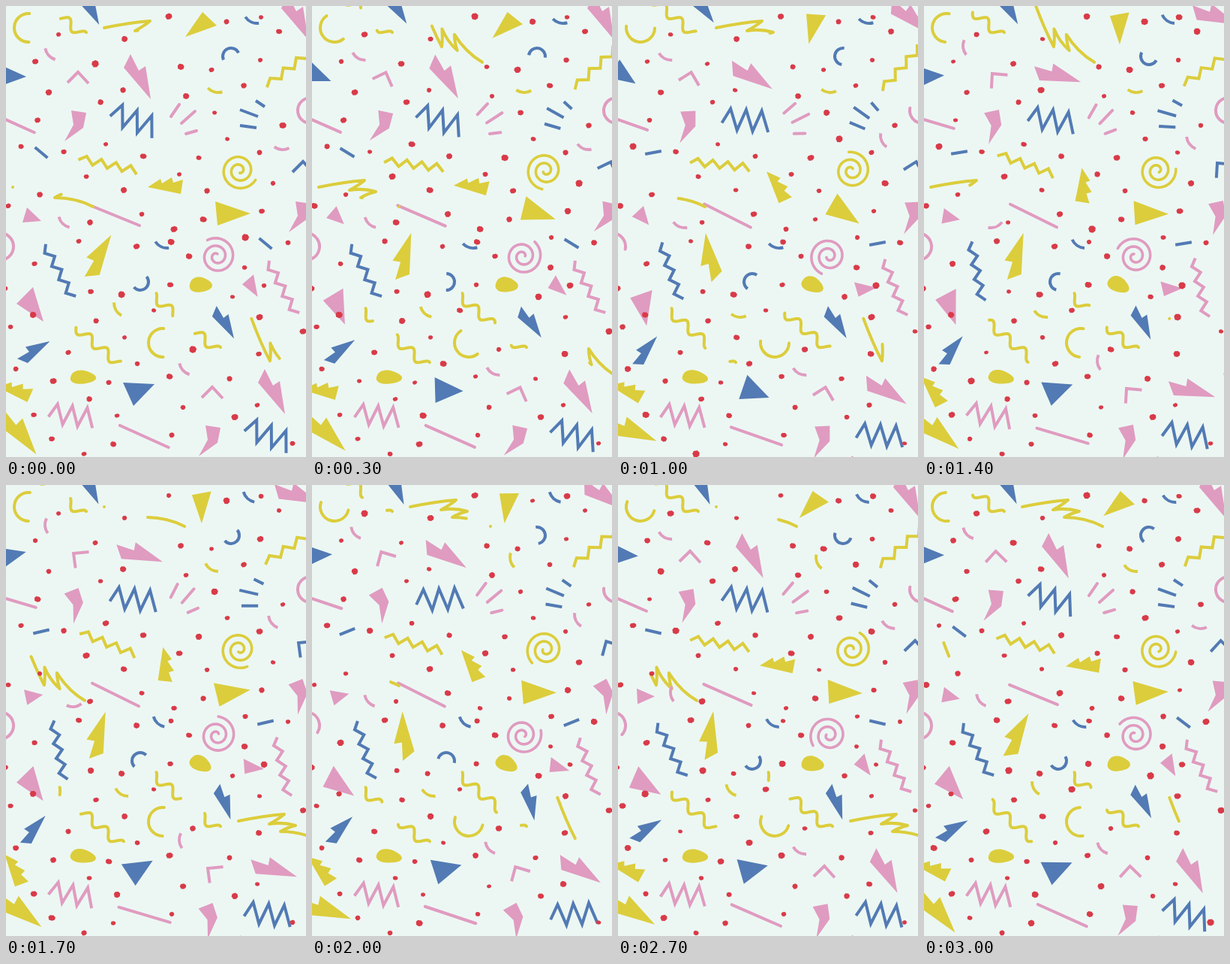
An HTML page for the animation above (3100 ms loop, 400 by 600 pixels).

```html
<!DOCTYPE html>
<html lang="en">
<head>
<meta charset="utf-8">
<title>Confetti</title>
<style>
html, body { margin: 0; width: 100%; height: 100%; overflow: hidden; background: #ecf7f3; }
svg { display: block; width: 400px; height: 600px; }
</style>
</head>
<body>
<svg id="stage" viewBox="0 0 400 600"></svg>
<script>
const stage = document.getElementById('stage');
const YELLOW = '#dccd3c', BLUE = '#527ab4', PINK = '#e09bc0', RED = '#d93a48';
const STEP = 100, COUNT = 31, TAU = Math.PI * 2;
// the pattern repeats on a tilted square lattice
const HERE = [0, 0], EAST = [299, 121], SOUTH = [-120, 299], DIAG = [179, 419];
const parts = [], dots = [];

const frac = v => v - Math.floor(v);
const clamp = v => Math.max(0, Math.min(1, v));
const noise = (a, b) => frac(Math.sin(a * 127.1 + b * 311.7 + 7.3) * 43758.5453);
const toPath = p => 'M' + p.map(v => +v.toFixed(2)).join(' ');

function node(attrs) {
  const el = document.createElementNS('http://www.w3.org/2000/svg', 'path');
  for (const k in attrs) el.setAttribute(k, attrs[k]);
  stage.appendChild(el);
  return el;
}

function middle(p) {
  const mid = odd => {
    const a = p.filter((v, i) => i % 2 === odd);
    return (Math.min(...a) + Math.max(...a)) / 2;
  };
  return [mid(0), mid(1)];
}

// sway = [one slow hump, two humps, one sine] in degrees
function turn([slow, twice = 0, sine = 0], n) {
  const a = TAU * n / COUNT;
  return slow * (1 - Math.cos(a)) / 2 + twice * (1 - Math.cos(2 * a)) / 2 + sine * Math.sin(a);
}

function add(attrs, mid, sway, { at = [HERE], base = 0, trim, spin } = {}) {
  for (const pos of at) parts.push({ el: node(attrs), pos, mid, sway, base, trim, spin });
}

function fill(color, p, sway, opt) {
  add({ d: toPath(p) + 'Z', fill: color }, middle(p), sway, opt);
}

function stroke(color, d, mid, sway, opt = {}) {
  add({
    d, fill: 'none', stroke: color, 'stroke-width': opt.width || 4, pathLength: 100,
    'stroke-linecap': opt.round ? 'round' : 'butt',
    'stroke-linejoin': opt.round ? 'round' : 'miter'
  }, mid, sway, opt);
}

function line(color, p, sway, opt) { stroke(color, toPath(p), middle(p), sway, opt); }

function bolt(color, x, y, size, base, sway, at) {
  const p = [-9, -30, 2, -8, 11, -14, 18, 30, -18, -12].map((v, i) => v * size + (i % 2 ? y : x));
  add({ d: toPath(p) + 'Z', fill: color }, [x, y], sway, { base, at });
}

function comb(x, y, base, sway) {
  const p = [-24, 1, -7, -10, -5, -4, 8, -12, 10, -5, 23, -9, 20, 10];
  fill(YELLOW, p.map((v, i) => v + (i % 2 ? y : x)), sway, { base });
}

function blob(x, y, w, h, sway) {
  const p = [];
  for (let a = 0; a < TAU; a += 0.16) {
    const r = 1 + 0.07 * Math.sin(3 * a + 1);
    p.push(x + w * r * Math.cos(a), y + h * r * Math.sin(a));
  }
  fill(YELLOW, p, sway);
}

// zigzag of equal teeth, centred on x, y
function zigzag(color, x, y, count, step, amp, base, sway, at) {
  const p = [];
  for (let i = 0; i < count; i++)
    p.push(x + (i - (count - 1) / 2) * step, y + (i % 2 ? -amp : amp) * (i ? 1 : 0.4));
  stroke(color, toPath(p), [x, y], sway, { base, at });
}

// arc whose middle points along base
function arc(color, x, y, r, span, base, sway, opt) {
  const a = span * TAU / 720, c = r * Math.cos(a), s = r * Math.sin(a);
  const d = `M${x + c} ${y - s}A${r} ${r} 0 ${span > 180 ? 1 : 0} 1 ${x + c} ${y + s}`;
  stroke(color, d, [x, y], sway, { base, ...opt });
}
const bow = (color, x, y, base, sway, at) => arc(color, x, y, 19, 63, base, sway, { at });

function spiral(color, x, y, base) {
  const p = [];
  for (let k = 0; k <= 1; k += 0.01) {
    const a = k * TAU * 2.15, r = 25 - 22 * k;
    p.push(x + r * Math.cos(a), y + r * Math.sin(a));
  }
  stroke(color, toPath(p), [x, y], [0], { round: true, width: 3.6, spin: 2, base });
}

// wave with a visible window that travels round twice per loop
function wave(x, y, start, at) {
  const p = [], dx = 86, dy = 73, len = Math.hypot(dx, dy);
  for (let k = 0; k <= 1; k += 0.01) {
    const w = -3 - 6 * Math.cos(4 * TAU * (k - 0.107));
    p.push(x + dx * k + w * dy / len, y + dy * k - w * dx / len);
  }
  const trim = n => {
    const from = (start + 200 * n / COUNT) % 100;
    return { from, to: from + 67 };
  };
  line(YELLOW, p, [0], { round: true, trim, at });
}

// scribble drawn and wiped in turn, every second time mirrored
function scribble(x, y, start, mirrorFirst, backward) {
  const d = `M${x - 53} ${y - 9}q34-7 61-9q-7 6-20 13q18-3 35 2q-12 3-20 8q28 0 51 12`;
  const trim = n => {
    const u = 2 * frac(3 * n / COUNT - start), v = u % 1;
    let from = 100 * clamp((v - 0.65) / 0.35), to = 100 * clamp(v / 0.5);
    if (backward) [from, to] = [100 - to, 100 - from];
    return { from, to, flip: (u < 1) === mirrorFirst };
  };
  stroke(YELLOW, d, [x, y], [0], { round: true, trim });
}

bolt(PINK, 175, 94, 1, 0, [-48, 8, -3], [HERE, DIAG]);
bolt(PINK, 385, 15, 1, 0, [-45, 13]);
bolt(BLUE, 108, 0, 0.85, -2, [0, -3, -7]);
bolt(BLUE, 289, 421, 0.75, -4, [8, 4, -12]);
bolt(BLUE, 37, 461, 0.75, -94, [-20, -2, -4]);
bolt(YELLOW, 125, 336, 1, -123, [-10, -40]);
bolt(YELLOW, 13, 567, 1.15, -12, [-12, -31, 4]);
comb(213, 240, 0, [92, -17, 5]);
comb(12, 512, 15, [45, -20, -12]);

fill(BLUE, [-8, 78, 27, 94, -9, 107], [-14, 32, 18]);
fill(YELLOW, [262, 8, 281, 26, 239, 41], [-55]);
fill(YELLOW, [279, 260, 326, 276, 282, 292], [-6, 30, 17]);
fill(BLUE, [156, 501, 198, 503, 170, 532], [-8, 42, 17]);
fill(PINK, [36, 374, 50, 420, 14, 396], [10, -7, 27]);
fill(PINK, [28, 268, 47, 286, 22, 288], [-20, 17, 35]);
fill(PINK, [317, 364, 344, 378, 318, 384], [-58, -13, -15], { base: 52 });
fill(PINK, [87, 139, 107, 142, 103, 162, 78, 180, 90, 158], [-25, -8, 15], { at: [HERE, EAST, DIAG] });
blob(259, 371, 15, 10, [25, 5]);
blob(102, 494, 17, 9, [8]);

line(PINK, [-45, 131, 44, 171], [-8, 1], { round: true, at: [HERE, DIAG], trim: () => ({ from: 20, to: 93 }) });
line(PINK, [114, 266, 178, 292], [4, 2], { round: true });
line(BLUE, [36, 195, 58, 195], [-50, -26, 7], { base: 40, at: [HERE, EAST] });
stroke(PINK, 'M220 147l11-16M234 156l18-16M240 170l14-4', [238, 150], [-8, 20, 5], { round: true });
stroke(BLUE, 'M333 126l12 8M312 138l24 9M312 159l22 3', [326, 145], [-8, 20, 5]);

zigzag(BLUE, 170, 152, 7, 10.4, 14, 20, [-12, -15, 5], [HERE, DIAG]);
zigzag(PINK, 87, 545, 7, 10, 13, 7, [4, -5]);
zigzag(BLUE, 70, 353, 9, 10, -5, 62, [18, -4]);
zigzag(PINK, 368, 375, 9, 10, -5, 62, [17, -5]);
zigzag(YELLOW, 136, 211, 9, 10, 5, 12, [10, -13, -3]);
zigzag(YELLOW, 377, 83, 8, 11, 5, -38, [5, -14, -3]);
line(PINK, [82, 102, 96, 88, 110, 103], [-52, 42, 18], { at: [HERE, DIAG] });
line(BLUE, [382, 221, 396, 207, 410, 222], [-52, 42, 18]);

wave(20, -35, 66, [HERE, DIAG]);
wave(70, 404, 30);
scribble(184, 38, 0.58, false, true);
scribble(62, 250, 0.92, false, true);
scribble(363, 456, 0.86, true, false);

const soft = { round: true };
arc(YELLOW, 30, 29, 19, 185, 181, [17, -132, 8], { round: true, at: [HERE, DIAG] });
arc(BLUE, 300, 67, 11, 180, 245, [-160, -55, 115]);
arc(BLUE, 179, 367, 11, 180, 50, [-205, -2, -52]);
arc(PINK, 406, 139, 17, 200, 180, [15, -146, 20], soft);
arc(PINK, -8, 320, 18, 200, 0, [0, -110], soft);
bow(BLUE, 335, 4, 115, [15, -10, -14], [HERE, SOUTH]);
bow(PINK, 71, 53, 138, [42, -57, -5], [HERE, DIAG]);
bow(PINK, 369, 172, 95, [45, 36]);
bow(YELLOW, 283, 96, 105, [0, 40, -45]);
bow(YELLOW, 163, 395, 150, [-30, -27, -10]);
bow(PINK, 89, 276, 135, [-65, 57, -25]);
spiral(YELLOW, 311, 219, 30);
spiral(PINK, 281, 333, 240);

// dots of one tile, repeated on the lattice
const seeds = [217, 14, 158, 44, 70, 38, 294, 21, 364, 34, 39, 74, 119, 77, 233, 81, 274, 85, 340, 15,
  339, 72, 317, 106, 57, 115, 126, 128, 156, 112, 240, 120, 278, 142, 42, 152, 133, 184, 183, 200,
  257, 202, 295, 177, 77, 194, 20, 187, 231, 224, 107, 227, 45, 251, 157, 245, 268, 246, 181, 277,
  112, 288, 3, 266, 263, 284, 224, 297, 318, 348, 338, 414, 83, 461];
for (const [dx, dy] of [HERE, EAST, SOUTH, DIAG])
  for (let i = 0; i < seeds.length; i += 2) {
    const x = seeds[i] + dx, y = seeds[i + 1] + dy;
    if (x < -4 || x > 404 || y > 604) continue;
    dots.push({ el: node({ d: 'M-1-.2L-.6-.9L.4-1L1-.4L.9 .5L.2 1L-.7 .8Z', fill: RED }), x, y });
  }

function draw(n) {
  for (const { el, pos, mid, sway, base, trim, spin } of parts) {
    const t = trim ? trim(n) : {};
    const a = base + (spin ? spin * 360 * n / COUNT : turn(sway, n));
    const pose = t.flip ? 'rotate(58) scale(1 -1)' : `rotate(${a})`;
    el.setAttribute('transform',
      `translate(${pos[0] + mid[0]} ${pos[1] + mid[1]}) ${pose} translate(${-mid[0]} ${-mid[1]})`);
    if (!trim) continue;
    const len = t.to - t.from;
    el.setAttribute('visibility', len < 1 ? 'hidden' : 'visible');
    el.setAttribute('stroke-dasharray', len > 99.5 ? 'none' : `${len} ${100 - len}`);
    el.setAttribute('stroke-dashoffset', -t.from);
  }
  dots.forEach(({ el, x, y }, i) => {
    const r = 3 + 1.8 * noise(i + 90, n), flat = 0.78 + 0.22 * noise(i + 200, n);
    const a = 40 * (noise(i + 300, n) - 0.5);
    el.setAttribute('transform', `translate(${x} ${y}) rotate(${a}) scale(${r} ${r * flat})`);
  });
}

let last = -1;
function tick() {
  const n = Math.floor(performance.now() / STEP) % COUNT;
  if (n !== last) draw(last = n);
  requestAnimationFrame(tick);
}
tick();
</script>
</body>
</html>
```
